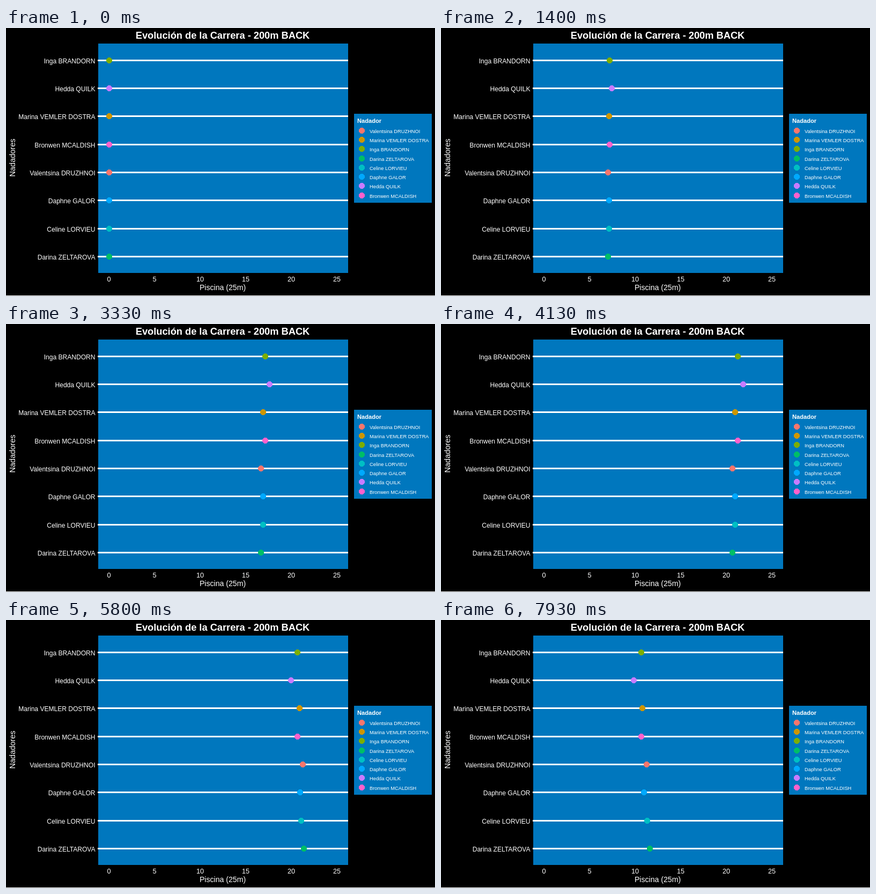
Recreate the animation shown at these times as an HTML page. Size 800 by 500 pixels, loop 8 s.

```html
<!DOCTYPE html>
<html lang="es">
<head>
<meta charset="utf-8">
<title>Evolución de la Carrera</title>
<style>
  html, body { margin: 0; width: 100%; height: 100%; overflow: hidden; background: #000; }
  svg { display: block; width: 800px; height: 500px; font-family: "Liberation Sans", Arial, sans-serif; }
  text { fill: #fff; }
  circle { shape-rendering: crispEdges; }
  .bold { font-weight: bold; }
</style>
</head>
<body>
<svg id="stage" viewBox="0 0 800 500"></svg>
<script>
const LOOP = 8000, STEPS = 120, START_X = 192.05, PX_PER_M = 17, POOL = 25;
const WATER = "#0077be";

// Lanes from top to bottom; out and back are the steps each length takes.
const swimmers = [
  { name: "Inga BRANDORN",        color: "#7cae00", out: 73, back: 80, legend: 2 },
  { name: "Hedda QUILK",          color: "#c77cff", out: 71, back: 79, legend: 6 },
  { name: "Marina VEMLER DOSTRA", color: "#cd9600", out: 74, back: 79, legend: 1 },
  { name: "Bronwen MCALDISH",     color: "#ff61cc", out: 73, back: 80, legend: 7 },
  { name: "Valentsina DRUZHNOI",  color: "#f8766d", out: 75, back: 80, legend: 0 },
  { name: "Daphne GALOR",         color: "#00a9ff", out: 74, back: 80, legend: 5 },
  { name: "Celine LORVIEU",       color: "#00bfc4", out: 74, back: 82, legend: 4 },
  { name: "Darina ZELTAROVA",     color: "#00be67", out: 75, back: 82, legend: 3 },
];

const stage = document.getElementById("stage");

function add(tag, attrs, content = "") {
  const el = document.createElementNS("http://www.w3.org/2000/svg", tag);
  for (const key in attrs) el.setAttribute(key, attrs[key]);
  el.textContent = content;
  return stage.appendChild(el);
}

const pixelCentre = v => Math.round(v) + 0.5;
const rect = (x, y, width, height, fill) => add("rect", { x, y, width, height, fill });
const dot = (cx, cy, fill) => add("circle", { cx, cy, r: 5.6, fill });
const label = (content, x, y, size, anchor = "start", extra = {}) =>
  add("text", { x, y, "font-size": size, "text-anchor": anchor, ...extra }, content);

rect(0, 0, 800, 499, "#000");
rect(0, 499, 800, 1, "#fff");
rect(172, 29, 466, 428, WATER);
rect(649, 160, 145, 166, WATER);

label("Evolución de la Carrera - 200m BACK", 404, 20, 18.25, "middle", { class: "bold" });
label("Piscina (25m)", 404, 489, 14.1, "middle");
label("Nadadores", 0, 0, 14.5, "middle", { transform: "translate(17 242) rotate(-90)" });
label("Nadador", 655, 177, 11.1, "start", { class: "bold" });

for (let m = 0; m <= POOL; m += 5) label(m, START_X + m * PX_PER_M, 473, 12.6, "middle");

swimmers.forEach((s, lane) => {
  const y = pixelCentre(59.8 + lane * 52.29);
  rect(171, y - 1.5, 467, 3, "#fff");
  label(s.name, 166.5, y + 5.5, 12.05, "end");
  s.dot = dot(pixelCentre(START_X), y, s.color);

  const legendY = pixelCentre(190.9 + s.legend * 17.25);
  dot(663.5, legendY, s.color);
  label(s.name, 678, legendY + 4.3, 9.3);
});

function metres({ out, back }, step) {
  return step <= out ? POOL * step / out : POOL * (1 - (step - out) / back);
}

function draw(now) {
  // Steps begin on times rounded to 10 ms, hence the small lead.
  const step = Math.min(STEPS - 1, Math.floor((now % LOOP + 4) * STEPS / LOOP));
  for (const s of swimmers) {
    s.dot.setAttribute("cx", pixelCentre(START_X + metres(s, step) * PX_PER_M));
  }
  requestAnimationFrame(draw);
}
draw(performance.now());
</script>
</body>
</html>
```
